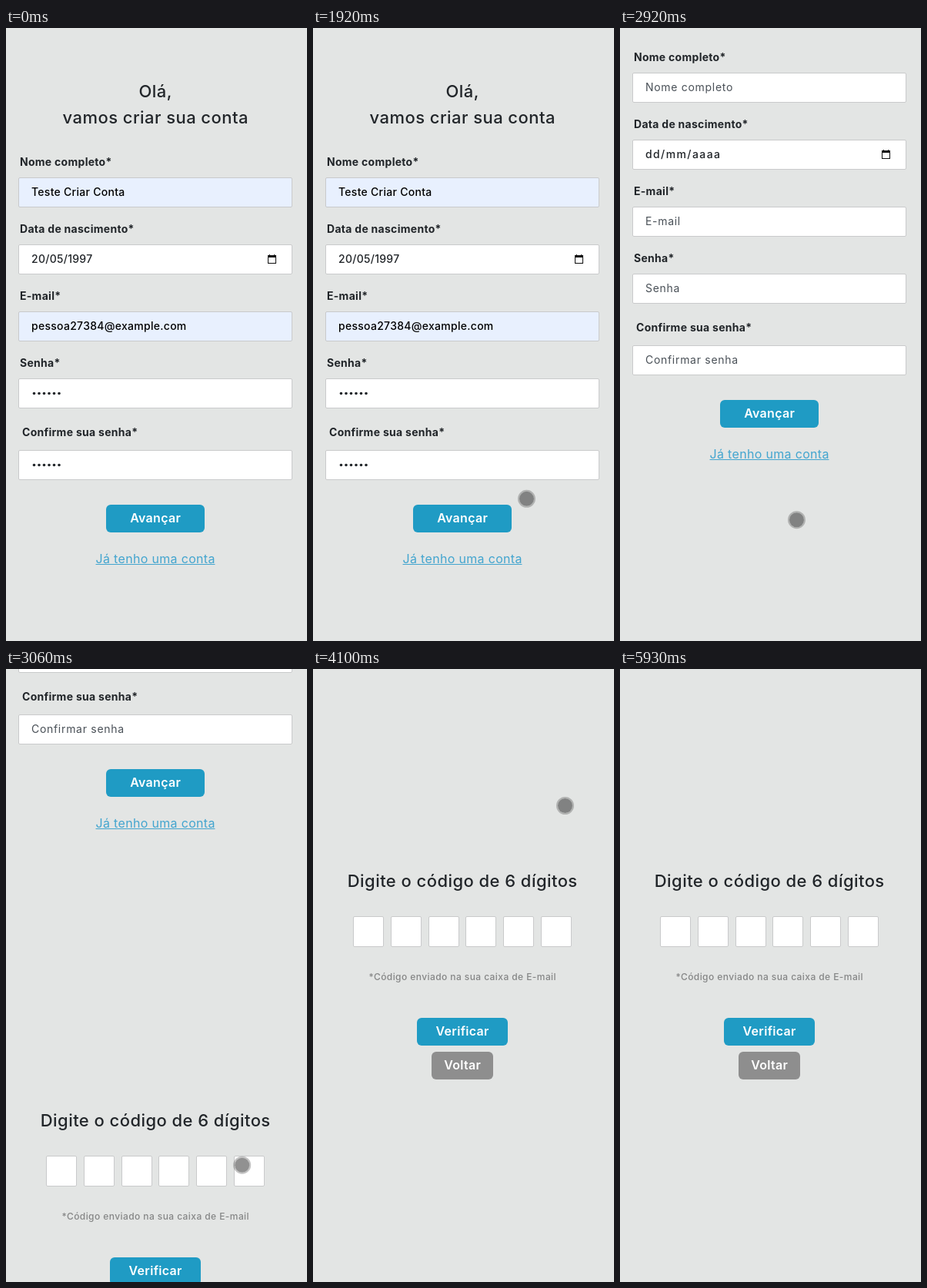
An HTML page with a canvas for the animation above (6 s loop, 391 by 796 pixels).

```html
<!DOCTYPE html>
<html lang="pt-BR">
<head>
<meta charset="utf-8">
<title>Criar conta</title>
<style>
  html, body { margin: 0; width: 100%; height: 100%; overflow: hidden; background: #e3e5e4; }
  canvas { display: block; }
</style>
</head>
<body>
<canvas id="stage" width="391" height="796"></canvas>
<script>
const ctx = document.getElementById('stage').getContext('2d');
const W = 391, H = 796, LOOP = 6000, SECTION = 800, MIDDLE = 194;
const INK = '#212529', BLUE = '#1f9bc4', GREY = '#8e8e8e', BORDER = '#c9cacb';

const FIRST_TICK = 510, TICK = 66.9;
const CLEAR_AT = 2580, SCROLL_AT = 2781, SCROLL_TIME = 480;

const FIELDS = [
  { label: 'Nome completo*', value: 'Teste Criar Conta', hint: 'Nome completo', autofill: true },
  { label: 'Data de nascimento*', value: '20/05/1997', date: true },
  { label: 'E-mail*', value: 'pessoa27384@example.com', hint: 'E-mail', autofill: true },
  { label: 'Senha*', hint: 'Senha', secret: true },
  { label: 'Confirme sua senha*', hint: 'Confirmar senha', secret: true, last: true }
];

const linear = k => k;
const easeIn = k => k * k;
const easeOut = k => 1 - (1 - k) ** 3;

function line(a, b, ease = linear) {
  return k => a.map((v, i) => v + (b[i] - v) * ease(k));
}

// Catmull-Rom curve through evenly timed points.
function spline(...points) {
  const last = points.length - 1;
  return k => {
    const i = Math.min(last - 1, Math.floor(k * last)), s = k * last - i;
    const p = n => points[Math.min(last, Math.max(0, i + n))];
    return [0, 1].map(c => {
      const [a, b, d, e] = [p(-1)[c], p(0)[c], p(1)[c], p(2)[c]];
      return b + s / 2 * (d - a + s * (2 * a - 5 * b + 4 * d - e + s * (3 * (b - d) + e - a)));
    });
  };
}

function orbit(cx, cy, rx, ry, fromDeg, toDeg) {
  return k => {
    const angle = (fromDeg + (toDeg - fromDeg) * k) * Math.PI / 180;
    return [cx + rx * Math.cos(angle), cy + ry * Math.sin(angle)];
  };
}

// The pointer is off stage between moves.
const MOVES = [
  { from: 510, to: 978, path: spline([276, 123], [249, 225], [140, 380], [37.5, 460.5]) },
  { from: 978, to: 1915, path: spline([37.5, 460.5], [147, 557], [370, 340], [280, 185], [70, 220],
    [30, 420], [100, 290], [285, 300], [277.5, 611.5]) },
  { from: 1915, to: 2316, path: line([277.5, 611.5], [219.5, 638], easeOut) },
  { from: 2316, to: 2850, path: () => [219.5, 638] },
  { from: 2850, to: 3120, path: line([219.5, 638], [375, 649], easeIn) },
  { from: 3850, to: 4050, path: line([385, 707], [327.5, 177.5], easeOut) },
  { from: 4050, to: 4123, path: () => [327.5, 177.5] },
  { from: 4123, to: 5059, path: orbit(220, 389, 97, 168, -45, -500) },
  { from: 5059, to: 5200, path: line([146, 281], [356, 699]) },
  { from: 5460, to: 5660, path: line([379, 737], [368.5, 806.5]) },
  { from: 5660, to: 5925, path: () => [368.5, 806.5] }
];

function pointerAt(time) {
  const move = MOVES.find(m => time >= m.from && time < m.to);
  return move && move.path((time - move.from) / (move.to - move.from));
}

// Same curve as CSS ease-in-out, solved by bisection.
function easeInOut(x) {
  if (x <= 0 || x >= 1) return x <= 0 ? 0 : 1;
  let lo = 0, hi = 1, s = 0.5;
  for (let i = 0; i < 20; i++) {
    s = (lo + hi) / 2;
    const at = 3 * (1 - s) * s * (0.42 * (1 - s) + 0.58 * s) + s ** 3;
    if (at < x) lo = s; else hi = s;
  }
  return s * s * (3 - 2 * s);
}

function text(str, x, y, size, { weight = 500, color = INK, track = 0.02, center = false } = {}) {
  ctx.font = `${weight} ${size}px Inter, sans-serif`;
  ctx.letterSpacing = `${size * track}px`;
  ctx.fillStyle = color;
  const width = ctx.measureText(str).width - size * track;
  const left = center ? x - width / 2 : x;
  ctx.fillText(str, left, y);
  return { left, width };
}

function heading(str, y) {
  text(str, MIDDLE, y, 22, { center: true });
}

function box(x, y, w, h, fill) {
  ctx.beginPath();
  ctx.roundRect(x + 0.5, y + 0.5, w - 1, h - 1, 1.5);
  ctx.fillStyle = fill;
  ctx.fill();
  ctx.lineWidth = 1;
  ctx.strokeStyle = BORDER;
  ctx.stroke();
}

function button(label, y, w, color) {
  ctx.beginPath();
  ctx.roundRect(MIDDLE - w / 2, y, w, 36, 6);
  ctx.fillStyle = color;
  ctx.fill();
  text(label, MIDDLE, y + 23, 16, { weight: 600, color: '#fff', center: true });
}

function disc(x, y, r, color) {
  ctx.beginPath();
  ctx.arc(x, y, r, 0, Math.PI * 2);
  ctx.fillStyle = color;
  ctx.fill();
}

function calendar(x, y) {
  ctx.strokeStyle = ctx.fillStyle = '#111';
  ctx.lineWidth = 1;
  ctx.strokeRect(x + 0.5, y + 1.5, 10, 10);
  ctx.fillRect(x, y + 1, 11, 3);
  ctx.fillRect(x + 2, y, 1, 2);
  ctx.fillRect(x + 8, y, 1, 2);
}

function field(f, row, filled) {
  const top = 194 + row * 87 + (f.last ? 6 : 0), base = top + 24;
  text(f.label, f.last ? 21 : 18, top - (f.last ? 18 : 15), 14, { weight: 700 });
  box(16, top, 356, 39, filled && f.autofill ? '#e8f0fe' : '#fff');
  if (f.date) calendar(340, top + 13);
  if (filled && f.secret) {
    for (let i = 0; i < 6; i++) disc(36.5 + i * 6.5, top + 19.5, 1.8, INK);
  } else if (filled) {
    text(f.value, 33, base, 14, { color: f.autofill ? '#000' : INK });
  } else if (f.date) {
    text('dd/mm/aaaa', 33, base, 14, { track: 0.1 });
  } else {
    text(f.hint, 33, base, 14, { weight: 400, color: '#495057', track: 0.05 });
  }
}

function signUp(filled) {
  heading('Olá,', 90);
  heading('vamos criar sua conta', 124);
  FIELDS.forEach((f, row) => field(f, row, filled));
  button('Avançar', 619, 128, BLUE);
  const link = text('Já tenho uma conta', MIDDLE, 695, 16,
    { weight: 400, color: '#43a5cf', center: true });
  ctx.fillRect(link.left, 696, link.width, 1);
}

function verify() {
  heading('Digite o código de 6 dígitos', 283);
  for (let i = 0; i < 6; i++) box(Math.round(52 + i * 48.8), 321, 40, 40, '#fff');
  text('*Código enviado na sua caixa de E-mail', MIDDLE, 404, 12,
    { color: '#858686', track: 0.035, center: true });
  button('Verificar', 453, 118, BLUE);
  button('Voltar', 497, 80, GREY);
}

function pointer(x, y) {
  disc(x, y, 9.5, 'rgba(0,0,0,.43)');
  ctx.beginPath();
  ctx.arc(x, y, 10.5, 0, Math.PI * 2);
  ctx.lineWidth = 2;
  ctx.strokeStyle = 'rgba(70,70,70,.32)';
  ctx.stroke();
}

function draw(now) {
  const t = now % LOOP;
  const tick = Math.floor((t - FIRST_TICK + 8) / TICK);
  const time = t < FIRST_TICK ? 0 : FIRST_TICK + tick * TICK;
  const scroll = Math.round(SECTION * easeInOut((time - SCROLL_AT) / SCROLL_TIME));

  ctx.fillStyle = '#e3e5e4';
  ctx.fillRect(0, 0, W, H);
  ctx.save();
  ctx.translate(0, -scroll);
  signUp(time < CLEAR_AT);
  ctx.translate(0, SECTION);
  verify();
  ctx.restore();

  const at = pointerAt(time);
  if (at) pointer(...at);
}

const start = performance.now();
function frame() {
  draw(performance.now() - start);
  requestAnimationFrame(frame);
}
frame();
</script>
</body>
</html>
```
